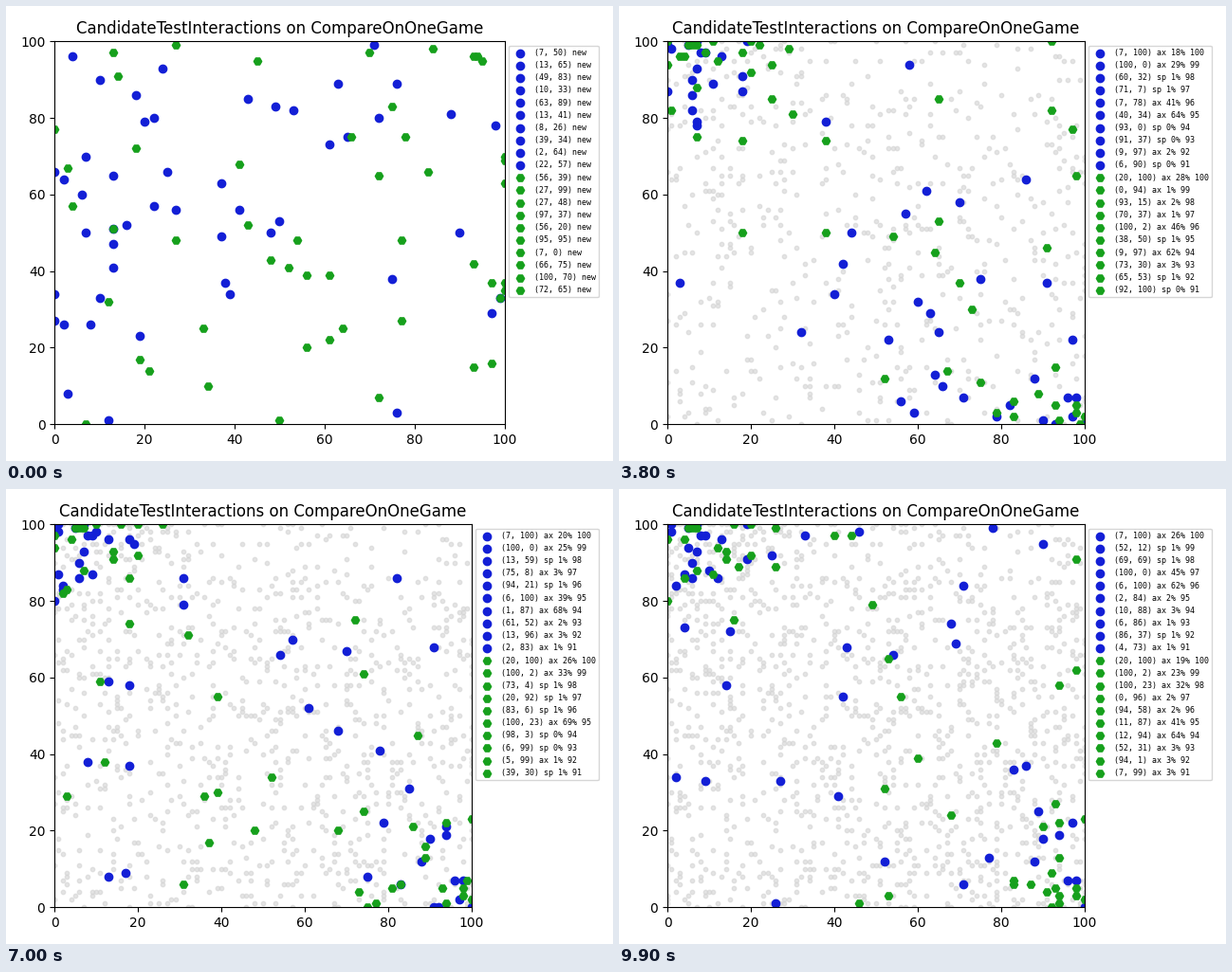
A matplotlib script that plays this animation: 640 px wide and 480 px high, repeating every 10 s.

```python
import math
import random

import matplotlib.pyplot as plt
from matplotlib.animation import FuncAnimation

GENERATIONS = 100
SIZE = 50
TOP = 10
BLUE, GREEN, GREY = "#131fd6", "#16a01c", "#d3d3d3"

# The ten points named first in the opening legend.
BLUE_START = [(7, 50), (13, 65), (49, 83), (10, 33), (63, 89),
              (13, 41), (8, 26), (39, 34), (2, 64), (22, 57)]
GREEN_START = [(56, 39), (27, 99), (27, 48), (97, 37), (56, 20),
               (95, 95), (7, 0), (66, 75), (100, 70), (72, 65)]

# Points that stay for good once found, in order of discovery.
BLUE_ELITE = [(8, 97), (88, 12), (98, 7), (96, 7), (5, 99), (9, 97),
              (13, 96), (1, 98), (7, 100), (100, 0), (7, 93), (6, 90),
              (6, 86), (2, 84), (6, 100), (94, 19)]
GREEN_ELITE = [(20, 100), (100, 2), (98, 5), (98, 3), (6, 99), (20, 92),
               (7, 99), (94, 1), (93, 5), (83, 6), (5, 99), (4, 96),
               (7, 88), (94, 22), (100, 23), (14, 93)]


def weakness(point):
    """Distance to the nearer rewarding corner; all points close by are equal."""
    x, y = point
    return max(28, min(math.hypot(x, 100 - y), math.hypot(100 - x, y)))


def newcomer(pop, rng):
    """A random point, sometimes a mutation of an existing one."""
    if rng.random() < 0.2:
        return tuple(min(100, max(0, round(rng.gauss(v, 8))))
                     for v in rng.choice(pop))
    return rng.randint(0, 100), rng.randint(0, 100)


def fill(pop, rng):
    while len(pop) < SIZE:
        p = newcomer(pop, rng)
        if p not in pop:
            pop.append(p)
    return pop


def evolve(start, elite, rng):
    pop = fill(list(start), rng)
    history = [pop]
    for gen in range(1, GENERATIONS):
        keep = elite[:(gen + 2) // 3]
        free = [p for p in pop if p not in keep]
        rng.shuffle(free)
        drops = max(8 - gen // 33, len(keep) + len(free) - SIZE)
        for _ in range(drops):
            free.remove(max(rng.sample(free, 2), key=weakness))
        pop = fill(keep + free, rng)
        history.append(pop)
    return history


def rank(pop, elite, gen, rng):
    """Legend lines: a few strong points each take a share of what is left."""
    if gen == 0:
        return [f"({x}, {y}) new" for x, y in pop[:TOP]]
    best = [p for p in elite if 100 in p and p in pop]
    rest = [p for p in pop if p not in best]
    chosen = best + rng.sample(rest, TOP - len(best))
    count = 6 if gen < 30 else rng.randint(3, 5)
    slots = {0, *rng.sample(range(1, 7), count - 1)}
    strong, weak = chosen[:count], chosen[count:]
    weights = [rng.uniform(1.3, 2) for _ in strong]
    lines = []
    for i in range(TOP):
        if i in slots:
            x, y = strong.pop(0)
            left = sum(weights) + 0.9
            kind, share = "ax", round(100 * weights.pop(0) / left)
        else:
            x, y = weak.pop(0)
            kind = rng.choice(["sp", "ax"])
            share = rng.randint(0, 1) if kind == "sp" else rng.randint(1, 3)
        lines.append(f"({x}, {y}) {kind} {share}% {100 - i}")
    return lines


def simulate():
    rng = random.Random(11)
    blues = evolve(BLUE_START, BLUE_ELITE, rng)
    greens = evolve(GREEN_START, GREEN_ELITE, rng)
    seen, steps = set(), []
    for gen, (blue, green) in enumerate(zip(blues, greens)):
        past = sorted(seen - set(blue) - set(green))
        labels = (rank(blue, BLUE_ELITE, gen, rng)
                  + rank(green, GREEN_ELITE, gen, rng))
        steps.append((past, blue, green, labels))
        seen.update(blue, green)
    return steps


steps = simulate()

fig, ax = plt.subplots(figsize=(6.4, 4.8), dpi=100)
ax.set(xlim=(0, 100), ylim=(0, 100))
ax.set_title("CandidateTestInteractions on CompareOnOneGame")
past_dots = ax.scatter([], [], s=10, color=GREY, alpha=0.6)
blue_dots = ax.scatter([], [], color=BLUE, marker="o")
green_dots = ax.scatter([], [], color=GREEN, marker="H")
legend = ax.legend([blue_dots] * TOP + [green_dots] * TOP, steps[0][3],
                   loc="upper left", bbox_to_anchor=(1, 1),
                   prop={"family": "DejaVu Sans Mono", "size": 6})
right_edge = {}


def fit(width):
    """Leave room beside the axes for a legend this many characters wide."""
    if width not in right_edge:
        fig.tight_layout()
        right_edge[width] = fig.subplotpars.right
    fig.subplots_adjust(right=right_edge[width])


def update(gen):
    past, blue, green, labels = steps[gen]
    past_dots.set_offsets(past or [(-50, -50)])
    blue_dots.set_offsets(blue)
    green_dots.set_offsets(green)
    for text, label in zip(legend.get_texts(), labels):
        text.set_text(label)
    fit(max(map(len, labels)))
    return past_dots, blue_dots, green_dots, legend


anim = FuncAnimation(fig, update, frames=GENERATIONS, interval=100,
                     repeat=True, repeat_delay=0)
plt.show()
```
